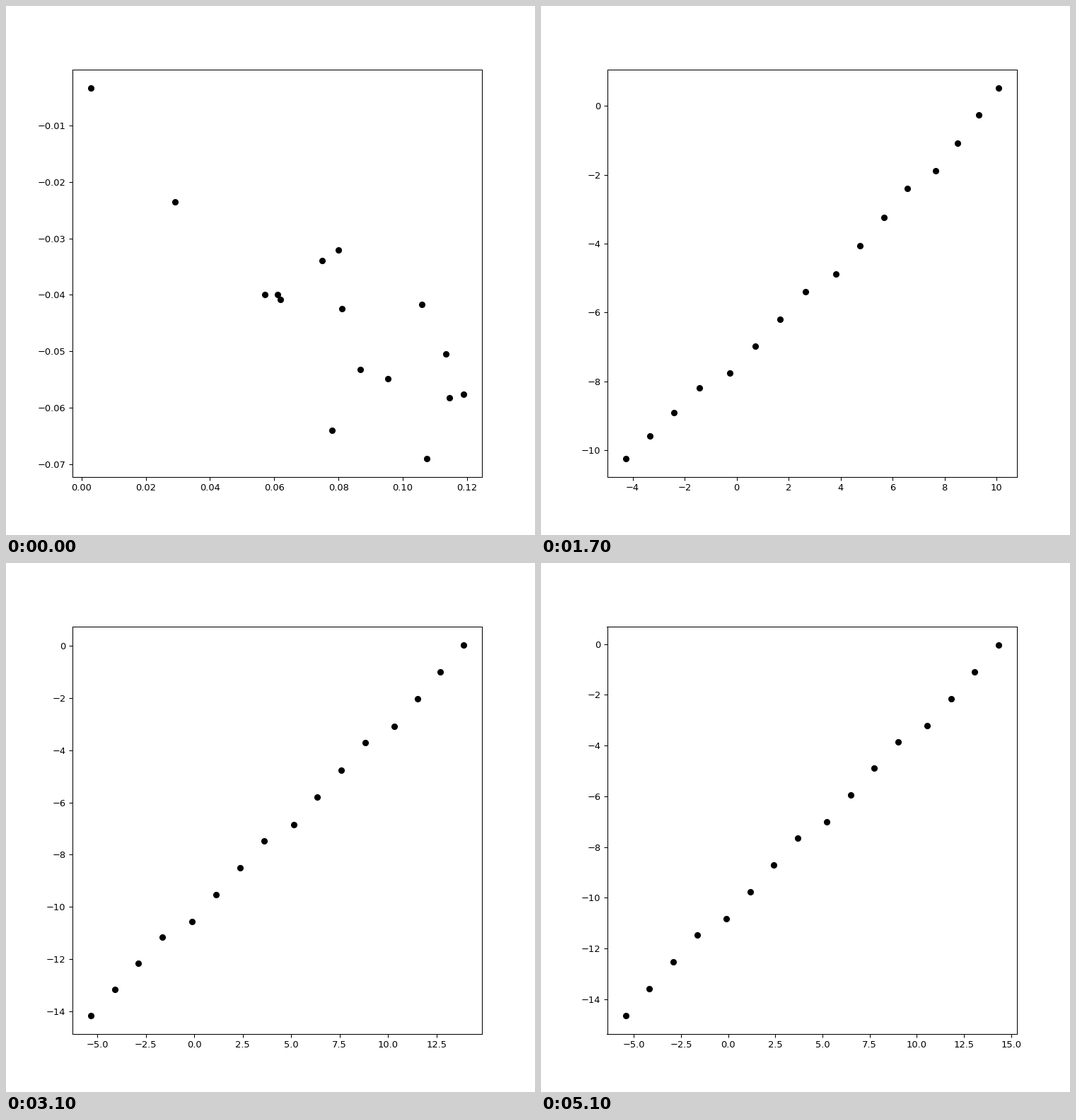
Animation, 748 px wide and 748 px high, one loop 5.2 s. Source, as a matplotlib script:

```python
import numpy as np
import matplotlib.pyplot as plt
from matplotlib.animation import FuncAnimation

FRAMES, INTERVAL = 52, 100
SETTLE, DECAY = 27, 0.235  # frame where the decay sets in, and its rate

index = np.arange(16)
u = index / 15
tooth = index % 4 - 3 * u  # sawtooth: four rows of four, joined end to end


def chain(xlim, ylim, reach=1, bend=0, dip=0, zig=1):
    """A line of points across the limits, bowed, stepped and capped."""
    x = reach * u + bend * u**2 * (1 - u) - 0.0037 * zig * tooth
    y = u + dip * u * (1 - u)**2 + 0.0073 * zig * tooth
    box = np.array([xlim, ylim])
    return box[:, :1] + np.array([np.minimum(x, 1), y]) * np.diff(box)


# The loose cloud that unrolls into a chain.
start = np.array([
    (0.0029, -0.0033), (0.0291, -0.0235), (0.0570, -0.0400), (0.0610, -0.0400),
    (0.0619, -0.0408), (0.0749, -0.0339), (0.0779, -0.0640), (0.0799, -0.0320),
    (0.0810, -0.0424), (0.0868, -0.0532), (0.0953, -0.0549), (0.1059, -0.0417),
    (0.1075, -0.0690), (0.1134, -0.0505), (0.1145, -0.0583), (0.1189, -0.0577)]).T
early = chain((-0.837, 1.131), (-1.245, 0.461), reach=1.14, dip=0.4, zig=0)
rising = chain((-2.443, 5.439), (-4.83, 0.39), reach=1.07, bend=-0.1, dip=-0.38, zig=-0.5)
middle = chain((-4.263, 10.077), (-10.24, 0.525), bend=0.18, dip=-0.21)
late = chain((-5.215, 13.21), (-13.41, 0.144), bend=0.10, dip=-0.14)
rest = chain((-5.426, 14.33), (-14.63, -0.04))

tail = np.array([31, 35, 39, 43, 51])
times = np.array([0, 4, 9, 17, SETTLE, *tail], float)
keys = np.array([start, early, rising, middle, late]
                + [rest + (late - rest) * np.exp(-DECAY * (t - SETTLE)) for t in tail])


def key_slopes(t, p):
    """Monotone cubic slopes: harmonic means of neighbouring secants."""
    h = np.diff(t)[:, None, None]
    d = np.diff(p, axis=0) / h
    w1, w2 = 2 * h[1:] + h[:-1], h[1:] + 2 * h[:-1]
    same = d[:-1] * d[1:] > 0
    a, b = np.where(same, d[:-1], 1), np.where(same, d[1:], 1)
    inner = np.where(same, (w1 + w2) / (w1 / a + w2 / b), 0)
    return np.concatenate([0.6 * d[:1], inner, 0 * d[:1]])


slopes = key_slopes(times, keys)


def points(n):
    i = min(np.searchsorted(times, n, side="right") - 1, len(times) - 2)
    h = times[i + 1] - times[i]
    s = (n - times[i]) / h
    return ((1 + 2 * s) * (1 - s)**2 * keys[i] + s * (1 - s)**2 * h * slopes[i]
            + s * s * (3 - 2 * s) * keys[i + 1] + s * s * (s - 1) * h * slopes[i + 1])


fig, ax = plt.subplots(figsize=(8, 8), dpi=93.5)
dots, = ax.plot([], [], "ko")


def draw(n):
    dots.set_data(*points(n))
    ax.relim()
    ax.autoscale_view()
    return dots,


anim = FuncAnimation(fig, draw, frames=FRAMES, init_func=lambda: draw(0),
                     interval=INTERVAL, repeat=True, repeat_delay=0)
plt.show()
```
